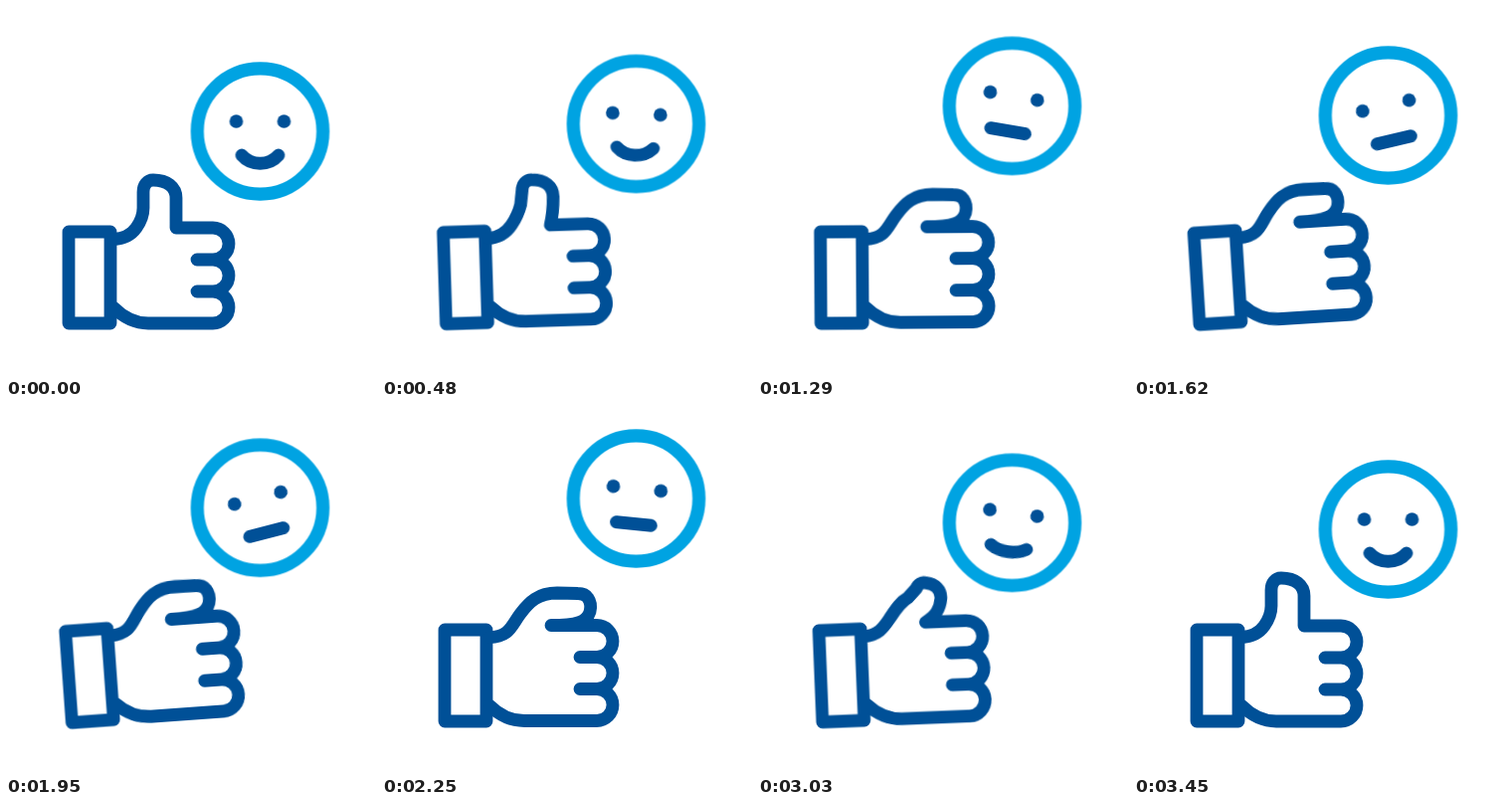
An HTML page for the animation above (3.6 s loop, 372 by 372 pixels).

```html
<!DOCTYPE html>
<html lang="en">
<head>
<meta charset="utf-8">
<title>Thumb and smile</title>
<style>
  html, body { margin: 0; width: 100%; height: 100%; overflow: hidden; background: #fff; }
  svg { display: block; width: 100vw; height: 100vh; }

  .line { fill: none; stroke: #005097; stroke-width: 12.8; stroke-linecap: round; stroke-linejoin: round; }
  .ring { fill: none; stroke: #00a3e2; stroke-width: 13.2; }
  .eye { fill: #005097; }

  .hand, .palm, .face, .tilt, .mouth {
    animation: 3600ms cubic-bezier(.37, 0, .63, 1) infinite;
  }
  .hand { animation-name: rock; transform-origin: 84px 273px; }
  .palm { animation-name: fold; }
  .face { animation-name: bob; }
  .tilt { animation-name: tilt; transform-origin: 0 0; }
  .mouth { animation-name: flatten; }

  @keyframes rock {
    0%, 8.333% { transform: rotate(0deg); }
    25% { transform: rotate(-8.8deg); }
    37.5% { transform: rotate(0deg); }
    50% { transform: rotate(-5.5deg); }
    62.5% { transform: rotate(0deg); }
    75% { transform: rotate(-5.5deg); }
    91.667%, 100% { transform: rotate(0deg); }
  }

  @keyframes bob {
    0%, 8.333% { transform: translateY(0px); }
    25% { transform: translateY(-36.5px); }
    45.833% { transform: translateY(-16px); }
    66.667% { transform: translateY(-32.5px); }
    91.667%, 100% { transform: translateY(0px); }
  }

  @keyframes tilt {
    0%, 8.333% { transform: rotate(0deg); }
    29.167% { transform: rotate(18deg); }
    50% { transform: rotate(-18deg); }
    70.833% { transform: rotate(18deg); }
    95.833%, 100% { transform: rotate(0deg); }
  }

  /* thumb and knuckles: open, then curled into a fist */
  @keyframes fold {
    0%, 8.333%, 91.667%, 100% {
      d: path("M108 234.5C118 234 126 230 131 223C136 216 138 210 138 203L138 187C138 180 142 175 148 175C162 175 171 182 171 193C171 203 171 213 171 223L208 223a16 16 0 0 1 0 32L192 255M208 255a16 16 0 0 1 0 32L192 287M208 287a16 16 0 0 1 0 32L143 319C130 319 118 313 108 303");
    }
    33.333%, 75% {
      d: path("M108 234.5C128 234.5 130 223 139 211C148 199 157 190 176 190L197 190.5C201 190.5 205 192 207 195C209.5 198.5 210.5 203 209 209C206 219 196 222.5 170 222.5L216 222.5a16 16 0 0 1 0 32L199 254.5M216 254.5a16 16 0 0 1 0 32L199 286.5M216 286.5a16 16 0 0 1 0 32L143 318.5C130 318.5 118 313 108 303");
    }
  }

  @keyframes flatten {
    0%, 8.333%, 91.667%, 100% { d: path("M-18.5 24C-9 35 9 35 18.5 24"); }
    33.333%, 75% { d: path("M-17.5 25.5C-6 25.5 6 25.5 17.5 25.5"); }
  }
</style>
</head>
<body>
<svg viewBox="0 0 372 372">
  <g class="hand">
    <rect class="line" x="63" y="227" width="42" height="92"/>
    <path class="line palm"/>
  </g>
  <g transform="translate(255.5 126)">
    <g class="face">
      <circle class="ring" r="63.2"/>
      <g class="tilt">
        <circle class="eye" cx="-24" cy="-10" r="6.8"/>
        <circle class="eye" cx="24" cy="-10" r="6.8"/>
        <path class="line mouth"/>
      </g>
    </g>
  </g>
</svg>
</body>
</html>
```
